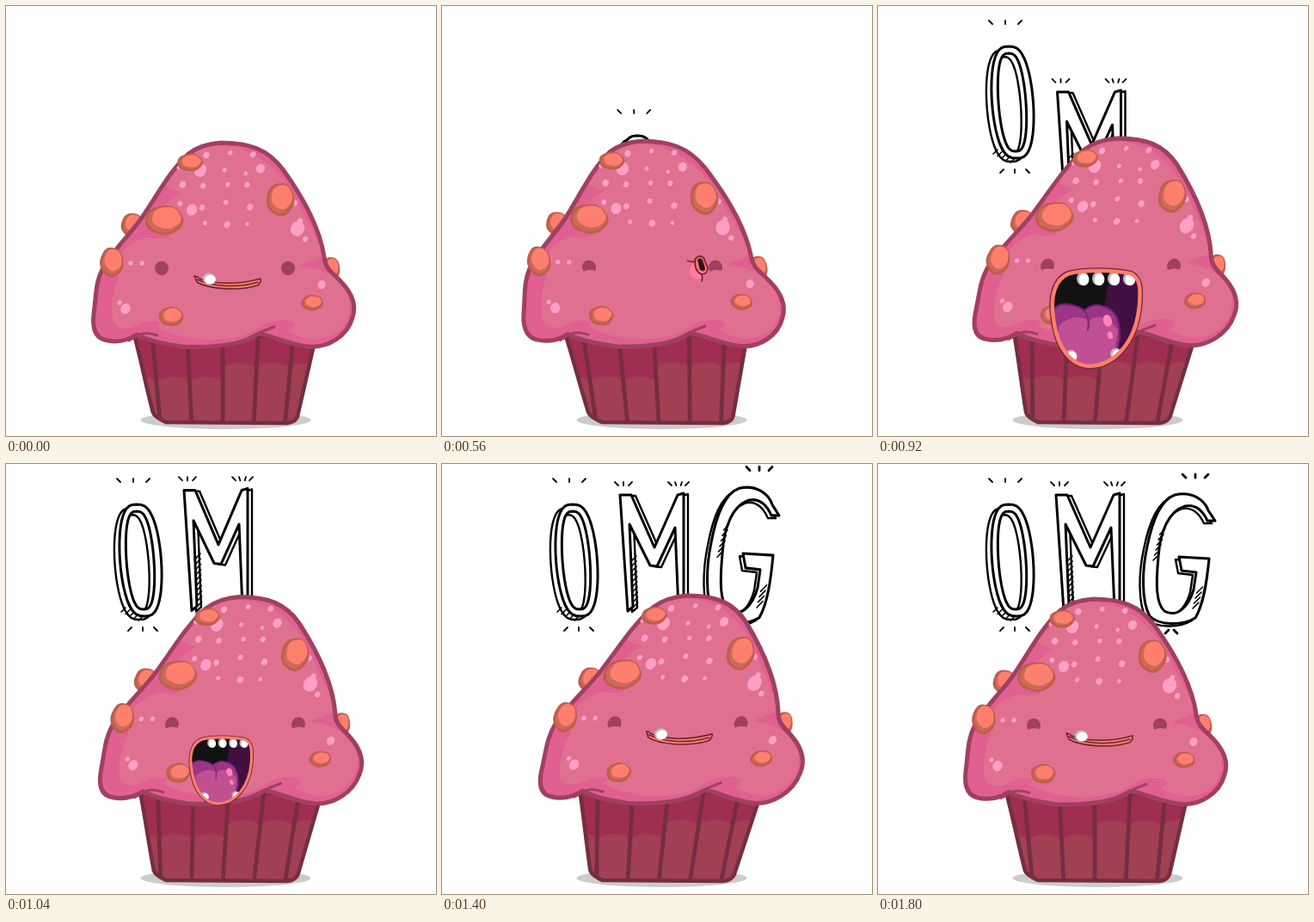
Animation of 500 by 500 pixels, one loop 2.12 s. Source, as an HTML page with a canvas:

```html
<!DOCTYPE html>
<html lang="en">
<head>
<meta charset="utf-8">
<title>OMG muffin</title>
<style>
html, body { margin: 0; width: 100%; height: 100%; overflow: hidden; background: #fff; }
canvas { display: block; width: 100vw; height: 100vh; }
</style>
</head>
<body>
<canvas id="stage" width="500" height="500"></canvas>
<script>
const ctx = document.getElementById('stage').getContext('2d');
const LOOP = 2120, STEP = 40, GROUND = 487, MIDDLE = 250;
const SQUINT_FROM = 560;
const C = {
  cap: '#e07090', capShade: '#e06092', edge: '#a04060',
  cup: '#a04052', cupShade: '#a02e50', cupEdge: '#742e40',
  chunk: '#cc6a58', chunkLit: '#ff7f6e', chunkEdge: '#bd5f4c',
  sprinkle: '#ffa0c6', lip: '#ff7f6b', lipEdge: '#6b2434', throat: '#420f42'
};

// each shout throws one letter out at its peak; x is the middle of the letter
const SHOUTS = [
  { peak: 640, side: -1, x: 156, draw: drawO },
  { peak: 970, side: 1, x: 247, draw: drawM },
  { peak: 1370, side: 1, x: 348, draw: drawG }
];

const clamp = v => Math.max(0, Math.min(1, v));
const bump = (t, centre, width) => Math.exp(-(((t - centre) / width) ** 2));

function seeded(seed) {
  return () => (seed = (seed * 16807) % 2147483647) / 2147483647;
}

// crouch before every peak, then lean and stretch
function pose(t) {
  let k = 0, s = t < SQUINT_FROM ? 1 : 1.006;
  for (const { peak, side } of SHOUTS) {
    const thrust = bump(t, peak, 90);
    k += side * .12 * thrust;
    s += .014 * thrust - .109 * bump(t, peak - 165, 50);
  }
  return [k, s];
}

function lean(k, s) {
  ctx.transform(1, 0, -k, s, k * GROUND, GROUND * (1 - s));
}

function scaleAt(x, y, sx, sy = sx) {
  ctx.translate(x, y);
  ctx.scale(sx, sy);
  ctx.translate(-x, -y);
}

function shape(path, fill, stroke, width = 2) {
  const p = new Path2D(path);
  if (fill) { ctx.fillStyle = fill; ctx.fill(p, 'evenodd'); }
  if (stroke) { ctx.strokeStyle = stroke; ctx.lineWidth = width; ctx.stroke(p); }
}

function oval(x, y, rx, ry, fill, turn = 0) {
  ctx.fillStyle = fill;
  ctx.beginPath();
  ctx.ellipse(x, y, rx, ry, turn, 0, Math.PI * 2);
  ctx.fill();
}

function clipped(path, draw) {
  ctx.save();
  ctx.clip(new Path2D(path));
  draw();
  ctx.restore();
}

// ---- letters

function block(path, dx, dy) {
  ctx.save();
  ctx.translate(dx, dy);
  shape(path, '#fff', '#000', 2.4);
  ctx.restore();
  shape(path, '#fff', '#000', 3);
}

function hatch(x, y, stepX, stepY, count, length = 5) {
  for (let i = 0; i < count; i++) {
    shape(`M${x + i * stepX} ${y + i * stepY}l${length} ${-length}`, null, '#000', 1.6);
  }
}

// a fan of short strokes; dir 1 above a letter, -1 below it
function sparks(x, y, spread, count, dir = 1, width = 1.8) {
  for (let i = 0; i < count; i++) {
    const u = 2 * i / (count - 1) - 1;
    shape(`M${x + u * spread} ${y}l${-u * 4} ${dir * 4}`, null, '#000', width);
  }
}

function slantedRing(cx, cy, rx, ry) {
  const points = [];
  for (let i = 0; i < 48; i++) {
    const a = i / 24 * Math.PI, c = Math.cos(a), y = Math.sin(a) * ry;
    points.push(`${cx + y * .07 + rx * Math.sign(c) * Math.abs(c) ** .7} ${cy + y}`);
  }
  return `M${points.join('L')}Z`;
}

function drawO() {
  block(slantedRing(156.5, 112, 24, 65) + slantedRing(156, 112, 16, 57), -6, 4);
  hatch(134, 172, 5, 2.5, 5);
  sparks(148, 17, 19, 3);
  sparks(159, 194, 17, 3, -1);
}

function drawM() {
  block('M207 36L220 36L247 97L274 36L281 34L281 172L275 169L271 74L250 119L242 118L218 70L222 166L216 171Z', 5, 1);
  hatch(221, 112, .2, 6, 10);
  sparks(211, 21, 10, 3);
  sparks(275, 21, 12, 4);
  sparks(250, 182, 18, 5, -1);
}

function drawG() {
  block('M392 66L383 66C377 53 368 47 357 49C338 55 328 78 326 108C323 139 323 162 333 171C347 179 361 167 367 146L370 126L353 124L350 108L385 110C382 141 378 164 369 179C354 188 327 188 316 177C306 159 307 123 313 96C319 66 328 42 345 36C365 31 380 42 384 54Z', -4, 3);
  hatch(320, 112, 1.5, -6, 6, 6);
  hatch(366, 168, 1.5, -6, 4, 7);
  sparks(369, 12, 15, 3, 1, 2.8);
  sparks(341, 197, 7, 2, -1, 2.8);
}

// letters slide out from behind the muffin and overshoot once
function drawLetter(t, { peak, x, draw }) {
  const out = (t - peak + 100) / 100;
  if (out < 0) return;
  const hidden = 1 - clamp(out), stretch = bump(t, peak + 35, 60);
  ctx.save();
  ctx.translate((MIDDLE - x) * hidden, 130 * hidden);
  scaleAt(x, 188, 1, 1 + .05 * stretch);
  draw();
  ctx.restore();
}

// ---- muffin

const CUP = 'M149 382C157 412 164 447 171 473Q173 478 186 484L327 485Q337 484 339 477L358 394Q250 370 149 382Z';

function drawCup() {
  const flute = i => [252 + (i - 2) * 41, 252 + (i - 2) * 36];
  shape(CUP, C.cupShade);
  clipped(CUP, () => {
    for (let i = -1; i < 5; i++) {
      const [top, foot] = flute(i), [nextTop, nextFoot] = flute(i + 1);
      const left = (top + foot) / 2, right = (nextTop + nextFoot) / 2, y = i < 2 ? 436 : 420;
      shape(`M${foot} 490L${left} ${y}Q${(left + right) / 2} ${y - 10} ${right} ${y}L${nextFoot} 490Z`, C.cup);
    }
    for (let i = 0; i < 5; i++) {
      const [top, foot] = flute(i);
      shape(`M${top} 385L${foot} 490`, null, C.cupEdge, 4.8);
    }
  });
  shape(CUP, null, C.cupEdge, 4.5);
}

// a lump with five rounded corners, lit from the upper right
function chunk(x, y, rx, ry, turn = 0) {
  const corner = i => {
    const a = i / 5 * Math.PI * 2 + turn;
    return [Math.cos(a) * rx * 1.2, Math.sin(a) * ry * 1.2];
  };
  let path = '';
  for (let i = 0; i <= 5; i++) {
    const [ax, ay] = corner(i), [bx, by] = corner(i + 1);
    const mid = `${ax * .4 + bx * .6} ${ay * .4 + by * .6}`;
    path += i ? `Q${ax} ${ay} ${mid}` : `M${mid}`;
  }
  ctx.save();
  ctx.translate(x, y);
  shape(path, C.chunk, C.chunkEdge, 3);
  ctx.translate(rx * .13, -ry * .17);
  ctx.scale(.82, .8);
  shape(path, C.chunkLit);
  ctx.restore();
}

const sprinkle = (x, y, r) => oval(x, y, r, r * 1.12, C.sprinkle, .5);

function drawSprinkles() {
  const random = seeded(29);
  for (let row = 0; row < 5; row++) {
    for (let x = row ? 203 : 236; x < 290; x += 26) {
      sprinkle(x + random() * 6 - 3, 171 + row * 20 + random() * 8 - 4, 2 + random() * 1.6);
    }
  }
  for (let i = 0; i < 3; i++) {
    sprinkle(336 + i * 6, 229 + i * 21, 3);
    sprinkle(158 - i * 13, 299 + i * 23 * (i - 1), 2.5);
  }
  sprinkle(226, 191, 7);
  sprinkle(296, 189, 5);
  sprinkle(216, 237, 6);
  sprinkle(339, 259, 8);
  sprinkle(367, 324, 4.5);
  sprinkle(139, 352, 5.5);
}

const CAP = 'M250 159C282 159 304 166 322 190C345 222 365 258 370 292C371 306 380 310 390 321C405 337 407 350 403 362C397 384 374 398 352 396C330 394 312 384 294 381C275 394 240 398 205 396C185 393 168 390 152 382C140 390 128 391 118 389C104 387 100 375 102 358C105 336 104 322 112 306C124 284 145 265 158 246C176 220 190 192 212 172C222 164 236 160 250 159Z';
const CAP_LIGHT = 'M226 164C295 152 330 205 345 240C359 264 366 280 369 290C356 298 342 298 344 303C366 304 384 315 394 328C405 348 399 370 384 380C365 393 344 387 328 377C342 373 336 362 310 367C298 370 290 377 282 381C250 393 205 389 175 373C188 367 170 363 152 371C140 378 128 376 124 365C121 347 124 332 131 316C126 290 140 275 164 269C185 273 197 267 181 260C170 240 190 225 204 216Q181 212 187 204Z';

function drawCap() {
  chunk(147, 255, 12, 13, .5);
  chunk(378, 306, 9, 13, .5);
  shape(CAP, C.capShade);
  clipped(CAP, () => shape(CAP_LIGHT, C.cap));
  shape(CAP, null, C.edge, 5);
  shape('M143 389C155 383 157 377 176 383M268 392C282 387 292 380 312 373', null, C.edge, 3);
  drawSprinkles();
  chunk(214, 182, 13.5, 9, .1);
  chunk(319, 225, 15, 18, .3);
  chunk(184, 249, 21, 16, .3);
  chunk(123, 298, 12.5, 16, -.6);
  chunk(192, 361, 13, 10);
  chunk(356, 345, 11.5, 8, .6);
}

function drawEyes(squint) {
  for (const x of [181, 328]) {
    oval(x, 305, 8, 8.2, C.edge);
    if (squint) oval(x + 1, 317, 12, 9, C.cap);
  }
}

// ---- mouths

function tooth(x, y, rx = 7, ry = 7) {
  oval(x, y, rx, ry, '#b9b9bd');
  oval(x + 1.5, y + 1, rx - 1.2, ry - 1, '#fff');
}

function lips(path, inside) {
  shape(path, C.lipEdge, C.lipEdge, 7);
  clipped(path, inside);
  shape(path, null, C.lip, 4.5);
}

function smile() {
  shape('M219 314Q222 314 225 317C240 323 268 325 296 317Q297 322 292 325C269 332 235 329 222 321Z', C.lip, C.lipEdge, 1.6);
  shape('M222 318C243 327 270 328 293 321', null, C.lipEdge, 1.5);
  tooth(236, 317, 7.5, 6.5);
}

function pucker() {
  oval(289, 306, 9, 10, '#ff7ca0');
  shape('M277 294Q281 296 286 295M294 309Q296 313 295 318', null, C.lipEdge, 1.6);
  shape('M286 292Q291 286 296 291L301 303Q301 310 294 310Q285 306 286 292Z', C.lip, C.lipEdge, 1.8);
  shape('M289 293Q293 289 295 295L298 304Q296 308 292 304Z', '#2b1024', C.lipEdge, 1);
}

function scream() {
  lips('M222 311C204 318 200 340 204 365C208 397 224 419 247 419C276 418 300 390 304 349C306 328 305 316 294 311C274 307 242 306 222 311Z', () => {
    shape('M195 300H275L266 400H195Z', '#121212');
    shape('M272 300H310V420H250Z', C.throat);
    shape('M200 360Q206 344 222 347Q234 349 240 354Q250 344 265 350Q284 357 281 390L272 425H200Z', '#9c3488', '#6a2064');
    shape('M210 372Q228 356 245 366Q264 354 279 377L272 425H205Z', '#c05092');
    shape('M240 354Q247 363 244 377', null, '#7c2a70');
    oval(267, 366, 5, 7, '#ff86b8', -.3);
    oval(270, 383, 3, 4.5, '#ff86b8', -.3);
    for (let i = 0; i < 4; i++) tooth(238 + i * 18, 317, 7, 8);
    tooth(224, 407);
    tooth(277, 405);
  });
}

function grin() {
  lips('M207 319C221 314 231 329 251 330C271 331 284 329 288 338C289 351 278 357 262 359C237 361 209 351 205 331Q203 322 207 319Z', () => {
    shape('M195 305H300V370H195Z', C.throat);
    oval(219, 341, 13, 9, '#a63486', .5);
    for (let i = 0; i < 4; i++) tooth(224 + i * 18, 327 + i * 4.5, 8);
    for (let i = 0; i < 3; i++) tooth(230 + i * 17, 347 + i * 2.5, 7.5, 6.5);
  });
}

const screamSize = t => .4 + .6 * bump(t, 930, 130);

// at is the moment of the pose the mouth is drawn for; that pose is undone first
function drawMouth(t) {
  const [draw, at] =
    t < 560 || t >= 1340 ? [smile, 0] :
    t < 790 ? [pucker, 680] :
    t < 1100 ? [scream, 920] : [grin, 1200];
  const [k, s] = pose(at);
  ctx.save();
  lean(-k / s, 1 / s);
  if (draw === scream) scaleAt(253, 340, screamSize(t));
  draw();
  ctx.restore();
}

function render(now) {
  const t = Math.floor((now % LOOP) / STEP) * STEP;
  ctx.fillStyle = '#fff';
  ctx.fillRect(0, 0, 500, 500);
  ctx.lineJoin = ctx.lineCap = 'round';
  oval(255.5, 481.5, 99, 10.5, '#ccc');
  for (const shout of SHOUTS) drawLetter(t, shout);
  ctx.save();
  lean(...pose(t));
  drawCup();
  drawCap();
  drawEyes(t >= SQUINT_FROM);
  drawMouth(t);
  ctx.restore();
}

const start = performance.now();
function loop() {
  render(performance.now() - start);
  requestAnimationFrame(loop);
}
loop();
</script>
</body>
</html>
```
